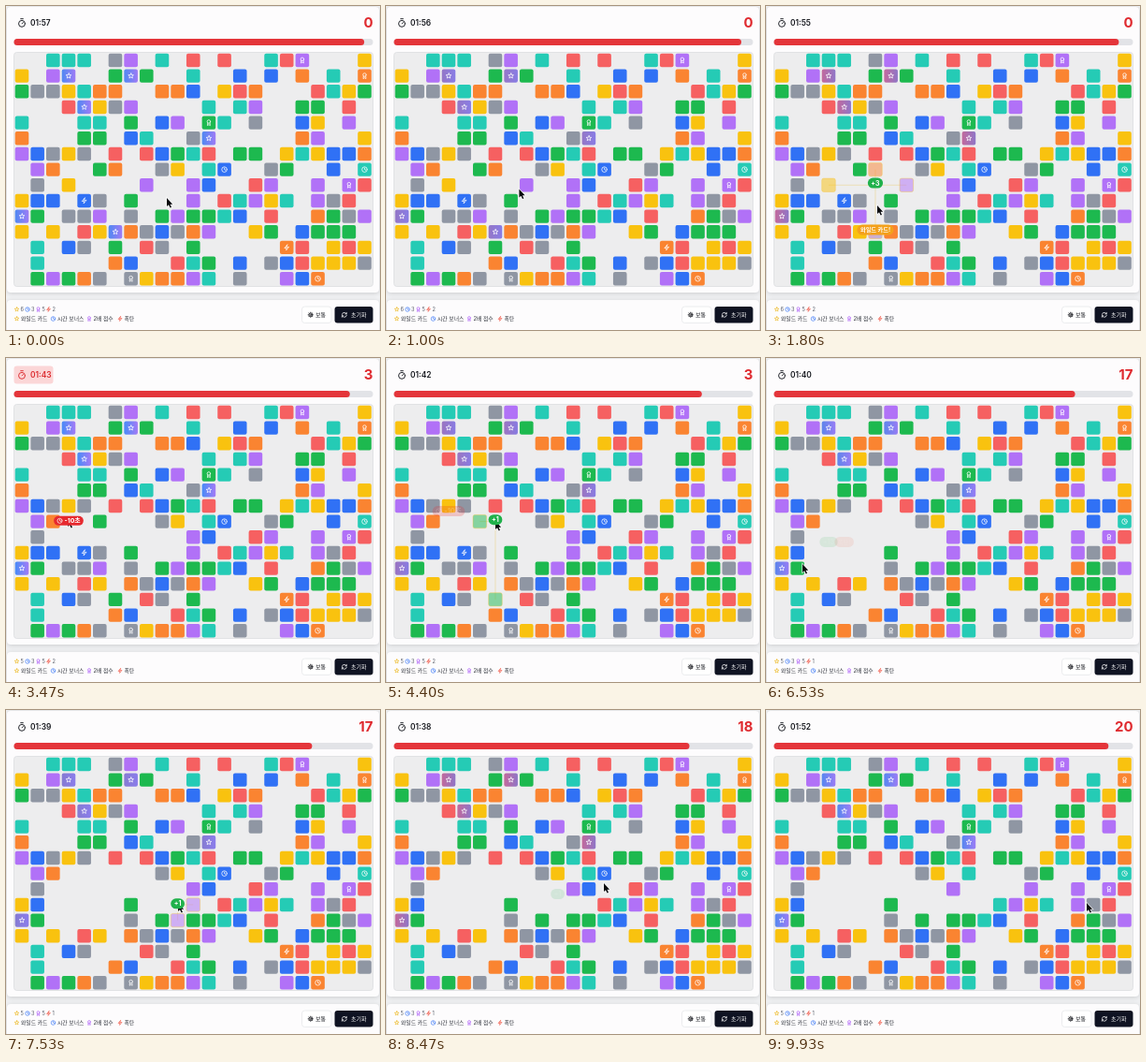
An HTML page with a canvas that plays this animation: 400x346 px, repeating every 10 s.

```html
<!DOCTYPE html>
<html lang="ko">
<head>
<meta charset="utf-8">
<style>
html, body { margin: 0; width: 100%; height: 100%; overflow: hidden; background: #f1f2f4; }
canvas { display: block; width: 400px; height: 346px; }
</style>
</head>
<body>
<canvas></canvas>
<script>
const LOOP = 10, PITCH = 16.66;
const FONT = 'Inter, "Noto Sans CJK KR", "Noto Sans CJK", sans-serif';
const canvas = document.querySelector('canvas');
const ctx = canvas.getContext('2d');
const dpr = window.devicePixelRatio || 1;
canvas.width = 400 * dpr;
canvas.height = 346 * dpr;

const COLORS = { t: '#25cbb5', a: '#8f96a3', p: '#b171f7', r: '#f66061', y: '#f9c20f', g: '#1db94f', b: '#3071f5', o: '#fa8431' };
const BOARD = [
  '..ttt.ap.t.r.r..trp...y',
  'y.pw..gwg..t..b.b.o.t.o',
  'gaaytoo..oob.yro...rtyg',
  '...rwyap....t.tp..gg.r.',
  't...tt.g.bp.gt.a..by.p.',
  'o...gg.bt..aw.....op..y',
  'pbaya.r.rbgtr.gg.ytybbo',
  '.po..go..ay.tb..ag..b.t',
  '.a.y....p..pb..rp..p.pr',
  'ybb.ba.g...p.rtpyt.par.',
  'wg.aap.a.gpggtb.r..ogap',
  'y.y.rywoabaop..yg.bggg.',
  '.t.ba.g.ra.g.....or.yry',
  '.t....ob..rtg.b.abryyya',
  '.gpgoa.ayoopt.a..pbo...'
];
const ICONS = {
  '18,0': 'medal', '22,1': 'medal', '12,4': 'medal', '21,8': 'medal', '7,14': 'medal',
  '13,7': 'clock', '22,7': 'clock', '19,14': 'clock', '4,9': 'bomb', '17,12': 'bomb'
};

// Each move: click time, clicked cell, linked tiles, blasted tiles, popups
const HOLD = 0.35;
const MOVES = [
  { t: 1.6, at: [6, 8], link: ['3,8', '8,8', '6,7', '6,11'], points: 3, extra: ['와일드 카드!', 6, 11, '#f3a11b'] },
  { t: 4.22, at: [6, 7], link: ['5,7', '6,12'], points: 1 },
  { t: 5.48, at: [3, 9], link: ['2,9', '4,9'], blast: ['5,9', '3,10', '4,10', '5,10'], points: 13, extra: ['폭탄!', 4, 9, '#ee5a3c'] },
  { t: 7.43, at: [10, 9], link: ['11,9', '10,10'], points: 1 },
  { t: 8.5, at: [13, 8], link: ['13,7', '12,8', '13,9', '15,8'], points: 2, extra: ['+15초', 13, 7, '#3071f5'] }
];
const PENALTY = 3.4, BONUS = 8.78;
const CURSOR = [
  [0, 172, 206], [0.6, 168, 203], [1.4, 117, 190], [1.62, 117, 191], [1.8, 119, 214], [2.3, 119, 214],
  [3.1, 67, 172], [3.5, 66, 172], [4.1, 117, 174], [4.4, 117, 175], [5.1, 67, 207], [5.65, 67, 207],
  [6.4, 38, 221], [6.65, 40, 221], [7.3, 184, 207], [7.6, 184, 207], [8.3, 233, 186], [8.8, 233, 186],
  [9.7, 343, 207], [10, 343, 207]
];

const clamp = v => Math.max(0, Math.min(1, v));
const cx = c => 17 + c * PITCH;
const cy = r => 58 + r * PITCH;

function box(x, y, w, h, radius, fill, stroke) {
  ctx.beginPath();
  ctx.roundRect(x, y, w, h, radius);
  if (fill) { ctx.fillStyle = fill; ctx.fill(); }
  if (stroke) { ctx.strokeStyle = stroke; ctx.lineWidth = 0.8; ctx.stroke(); }
}

function text(str, x, y, size, color, weight = 400, align = 'left') {
  ctx.font = `${weight} ${size}px ${FONT}`;
  ctx.fillStyle = color;
  ctx.textAlign = align;
  ctx.textBaseline = 'alphabetic';
  ctx.fillText(str, x, y);
}

const SHAPES = {
  star() {
    for (let i = 0; i < 10; i++) {
      const a = i * Math.PI / 5 - Math.PI / 2, r = i % 2 ? 4.5 : 10;
      ctx.lineTo(r * Math.cos(a), r * Math.sin(a));
    }
    ctx.closePath();
  },
  clock() {
    ctx.arc(0, 0, 9.5, 0, 7);
    ctx.moveTo(0, -5); ctx.lineTo(0, 0); ctx.lineTo(4, 2);
  },
  medal() {
    ctx.arc(0, -4, 6, 0, 7);
    ctx.moveTo(-4, 1); ctx.lineTo(-5, 10); ctx.lineTo(0, 7); ctx.lineTo(5, 10); ctx.lineTo(4, 1);
  },
  bomb() {
    ctx.moveTo(2, -10); ctx.lineTo(-8, 2); ctx.lineTo(0, 2); ctx.lineTo(-2, 10); ctx.lineTo(8, -2); ctx.lineTo(0, -2);
    ctx.closePath();
  },
  timer() {
    ctx.arc(0, 2, 8, 0, 7);
    ctx.moveTo(-3, -10); ctx.lineTo(3, -10);
    ctx.moveTo(0, 2); ctx.lineTo(3, -1);
  },
  gear() {
    ctx.arc(0, 0, 3, 0, 7);
    ctx.moveTo(7, 0); ctx.arc(0, 0, 7, 0, 7);
    for (let a = 0; a < 6.2; a += Math.PI / 4) {
      ctx.moveTo(7 * Math.cos(a), 7 * Math.sin(a));
      ctx.lineTo(10 * Math.cos(a), 10 * Math.sin(a));
    }
  },
  refresh() {
    ctx.arc(0, 0, 9, 3.3, 5.9);
    ctx.moveTo(9, -9); ctx.lineTo(9, -3.5); ctx.lineTo(3.5, -3.5);
    ctx.moveTo(9, 1.5); ctx.arc(0, 0, 9, 0.16, 2.76);
    ctx.moveTo(-9, 9); ctx.lineTo(-9, 3.5); ctx.lineTo(-3.5, 3.5);
  }
};

function icon(name, x, y, size, color, weight = 2.6) {
  ctx.save();
  ctx.translate(x, y);
  ctx.scale(size / 22, size / 22);
  ctx.beginPath();
  SHAPES[name]();
  ctx.strokeStyle = color;
  ctx.lineWidth = weight;
  ctx.lineJoin = ctx.lineCap = 'round';
  ctx.stroke();
  ctx.restore();
}

function secondsAt(t) {
  return Math.floor(117.35 - t) - (t >= PENALTY ? 10 : 0) + (t >= BONUS ? 15 : 0);
}

// Bar width eases for one second towards every new clock value
function barSeconds(t) {
  const changes = [PENALTY, BONUS];
  for (let k = 0.35; k < LOOP; k++) changes.push(k);
  changes.sort((a, b) => a - b);
  let from = 117.7, target = 117, start = -0.65;
  const value = now => from + (target - from) * (1 - Math.pow(1 - clamp(now - start), 2.2));
  for (const change of changes) {
    if (change > t) break;
    from = value(change);
    target = secondsAt(change + 1e-4);
    start = change;
  }
  return value(t);
}

function wildFill(x, t) {
  const shift = (1 - Math.cos(2 * Math.PI * (t - 0.2) / (LOOP / 3))) / 2;
  const left = x - 7 - 15 * (1 - shift);
  const fill = ctx.createLinearGradient(left - 15 * shift + 15 * (1 - shift), 0, left + 30, 0);
  const mix = (a, b) => `rgb(${a.map((v, i) => Math.round(v + (b[i] - v) * shift))})`;
  fill.addColorStop(0, mix([72, 139, 247], [247, 92, 112]));
  fill.addColorStop(1, mix([168, 122, 246], [88, 132, 246]));
  return fill;
}

function drawTiles(t) {
  const removed = {};
  for (const m of MOVES) for (const key of [...m.link, ...(m.blast || [])]) removed[key] = m.t;
  BOARD.forEach((row, r) => [...row].forEach((kind, c) => {
    if (kind === '.') return;
    const key = c + ',' + r, age = t - removed[key];
    if (age >= HOLD) return;
    const x = cx(c), y = cy(r), matched = age >= 0;
    ctx.globalAlpha = matched ? 0.5 : 1;
    box(x - 7.3, y - 7.2, 14.6, 14.4, 2, kind === 'w' ? wildFill(x, t) : COLORS[kind], matched && '#f5c542');
    const name = kind === 'w' ? 'star' : ICONS[key];
    if (name) icon(name, x, y, 6.5, '#fff');
    ctx.globalAlpha = 1;
  }));
}

function drawLinks(t) {
  for (const m of MOVES) {
    if (t < m.t || t >= m.t + HOLD) continue;
    ctx.strokeStyle = 'rgba(235,205,110,.55)';
    ctx.lineWidth = 0.8;
    for (const key of m.link) {
      const [c, r] = key.split(',');
      ctx.beginPath();
      ctx.moveTo(cx(m.at[0]), cy(m.at[1]));
      ctx.lineTo(cx(+c), cy(+r));
      ctx.stroke();
    }
  }
}

function popup(str, c, r, color, age, size = 7, mark) {
  if (age < 0 || age > 1.1) return;
  const scale = 0.7 + 0.3 * clamp(age / 0.1);
  ctx.save();
  ctx.globalAlpha = clamp(age / 0.06) * clamp((1.1 - age) / 0.45);
  ctx.translate(cx(c), cy(r) - 11 * age);
  ctx.scale(scale, scale);
  ctx.font = `700 ${size}px ${FONT}`;
  const w = ctx.measureText(str).width + 7 + (mark ? 9 : 0);
  box(-w / 2, -5.5, w, 11, 5.5, color);
  if (mark) icon(mark, -w / 2 + 7, 0, 6.5, '#fff');
  text(str, mark ? 4.5 : 0, size * 0.36, size, '#fff', 700, 'center');
  ctx.restore();
}

function drawPopups(t) {
  for (const m of MOVES) {
    popup('+' + m.points, ...m.at, '#20b14b', t - m.t);
    if (m.extra) {
      const [str, c, r, color] = m.extra;
      popup(str, c, r, color, t - m.t, 6.2);
    }
  }
  popup('-10초', 3, 7, '#e6292f', t - PENALTY, 7.5, 'clock');
}

function drawHeader(t) {
  const alert = t >= PENALTY && t < PENALTY + 1;
  const color = alert ? '#dc2c30' : '#17191f';
  if (alert) box(8.5, 8.5, 42, 19, 3, '#fbd6d7');
  icon('timer', 17, 18, 9.5, color, 2.2);
  const s = secondsAt(t);
  const clock = `0${Math.floor(s / 60)}:${String(s % 60).padStart(2, '0')}`;
  text(clock, 26, 21, 8.4, color, 600);
  const score = MOVES.reduce((sum, m) => sum + (t >= m.t + HOLD ? m.points : 0), 0);
  text(score, 392.5, 23.3, 15, '#df2b30', 700, 'right');
  box(8.5, 35, 384, 7, 3.5, '#e2e3e7');
  box(8.5, 35, 384 * barSeconds(t) / 120, 7, 3.5, '#e4353a');
}

function drawFooter(t) {
  const after = i => t >= MOVES[i].t + HOLD ? 1 : 0;
  const legend = [
    ['star', '#eab30c', 6 - after(0), 11.5, '와일드 카드', 11.5],
    ['clock', '#3071f5', 3 - after(4), 23, '시간 보너스', 50.5],
    ['medal', '#a855f7', 5, 34.5, '2배 점수', 89],
    ['bomb', '#ef4d3c', 2 - after(2), 45.5, '폭탄', 122]
  ];
  for (const [name, color, count, x, label, labelX] of legend) {
    icon(name, x, 324, 5.3, color);
    text(count, x + 4, 326.1, 5.6, '#555b66');
    icon(name, labelX, 334, 5.3, color);
    text(label, labelX + 4.5, 336.2, 5.8, '#30343c');
  }
  box(316.5, 321, 31.5, 17.5, 3, '#fff', '#e6e7ea');
  icon('gear', 325.8, 329.8, 6, '#17191f');
  text('보통', 331, 332.1, 6, '#17191f', 500);
  box(351.5, 321, 41, 17.5, 3, '#0f1322');
  icon('refresh', 361.8, 329.8, 6, '#fff');
  text('초기화', 369, 332.1, 6, '#fff', 500);
}

function drawCursor(t) {
  const i = Math.max(1, CURSOR.findIndex(k => k[0] > t));
  const [t0, x0, y0] = CURSOR[i - 1], [t1, x1, y1] = CURSOR[i];
  const u = clamp((t - t0) / (t1 - t0)), e = u * u * (3 - 2 * u);
  ctx.save();
  ctx.translate(x0 + (x1 - x0) * e, y0 + (y1 - y0) * e);
  const path = new Path2D('M0 -1V8L2 6.2L3.6 9.6L5 9L3.5 5.7H6.2Z');
  ctx.strokeStyle = '#fff';
  ctx.lineWidth = 1.2;
  ctx.stroke(path);
  ctx.fillStyle = '#08090c';
  ctx.fill(path);
  ctx.restore();
}

function panel(y, h, radius) {
  ctx.save();
  ctx.shadowColor = 'rgba(0,0,0,.16)';
  ctx.shadowBlur = 5 * dpr;
  ctx.shadowOffsetY = dpr;
  box(1, y, 398, h, radius, '#fdfcfd');
  ctx.restore();
}

function draw(now) {
  const t = now / 1000 % LOOP;
  ctx.setTransform(dpr, 0, 0, dpr, 0, 0);
  ctx.fillStyle = '#f1f2f4';
  ctx.fillRect(0, 0, 400, 346);
  panel(1, 305, 4);
  panel(314, 40, 4);
  drawHeader(t);
  box(8.5, 49.5, 384, 250, 3, '#ededee', '#dcdde0');
  drawLinks(t);
  drawTiles(t);
  drawFooter(t);
  drawCursor(t);
  drawPopups(t);
  requestAnimationFrame(draw);
}
requestAnimationFrame(draw);
</script>
</body>
</html>
```
